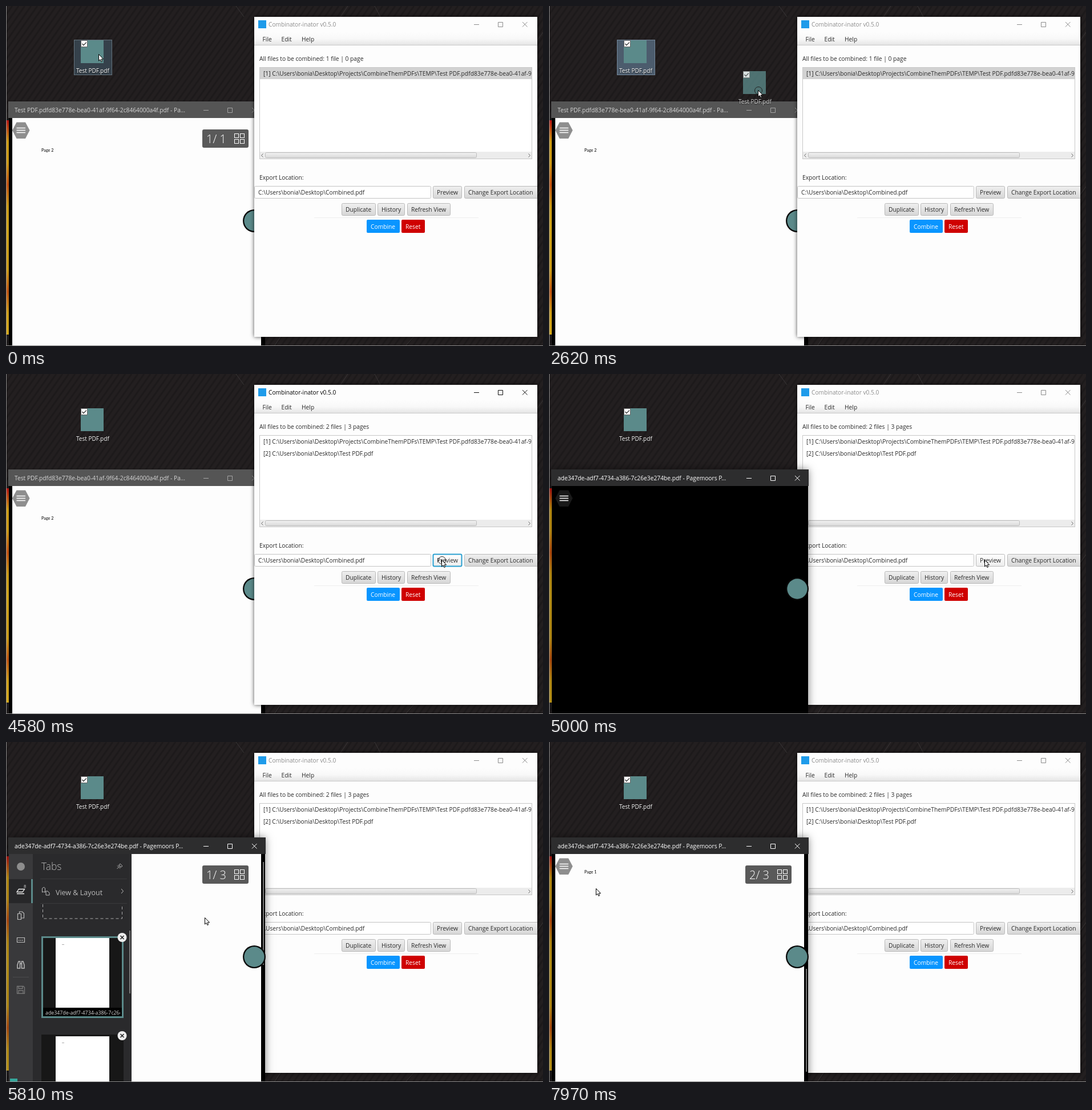
An HTML page with a canvas that plays this animation: 941 by 595 pixels, repeating every 8 s.

```html
<!DOCTYPE html>
<html lang="en">
<head>
<meta charset="utf-8">
<title>Combining PDF files</title>
<style>
  html, body { margin: 0; width: 100%; height: 100%; overflow: hidden; background: #231f20; }
  canvas { display: block; }
</style>
</head>
<body>
<canvas id="stage" width="941" height="595"></canvas>
<script>
const g = document.getElementById('stage').getContext('2d');
const LOOP = 8000, TEAL = '#5b8a8a', USER = 'C:\\Users\\bonia\\Desktop\\';
const OLD_ID = 'Test PDF.pdfd83e778e-bea0-41af-9f64-2c8464000a4f.pdf';
const NEW_ID = 'ade347de-adf7-4734-a386-7c26e3e274be';

// pointer path: [step, x, y]
const PATH = [
  [1, 162, 84], [3, 166, 90], [4, 166, 90], [6, 110, 48], [7, 101, 39], [10, 242, 130], [12, 213, 136],
  [13, 205, 130], [15, 157, 93], [16, 157, 93], [19, 366, 147], [20, 525, 178], [24, 525, 178],
  [29, 763, 325], [37, 763, 325], [40, 432, 325], [42, 348, 307], [48, 101, 259], [50, 82, 256]
];
const clamp = (v, a = 0, b = 1) => Math.min(b, Math.max(a, v));

function pointer(n) {
  const i = PATH.findIndex(p => p[0] >= n);
  if (i < 0) return PATH[PATH.length - 1].slice(1);
  if (i === 0) return PATH[0].slice(1);
  const [a, ax, ay] = PATH[i - 1], [b, bx, by] = PATH[i], k = (n - a) / (b - a);
  return [ax + (bx - ax) * k, ay + (by - ay) * k];
}

// drawing helpers: boxes are given by their edges, text by its vertical centre
function rect(x, y, r, b, color) { g.fillStyle = color; g.fillRect(x, y, r - x, b - y); }
function frame(x, y, r, b, color, w = 1) {
  g.strokeStyle = color; g.lineWidth = w;
  g.strokeRect(x + w / 2, y + w / 2, r - x - w, b - y - w);
}
function round(x, y, r, b, rad, fill, stroke) {
  g.beginPath(); g.roundRect(x, y, r - x, b - y, rad);
  if (fill) { g.fillStyle = fill; g.fill(); }
  if (stroke) { g.strokeStyle = stroke; g.lineWidth = 1; g.stroke(); }
}
function disc(x, y, r, fill) { g.beginPath(); g.arc(x, y, r, 0, 7); g.fillStyle = fill; g.fill(); }
function path(d, color, w = 1, fill) {
  const p = new Path2D(d);
  if (fill) { g.fillStyle = fill; g.fill(p); }
  if (color) { g.strokeStyle = color; g.lineWidth = w; g.stroke(p); }
}
function text(s, x, y, color = '#2b2b2b', size = 10.25, weight = 400, face = 'Open Sans') {
  g.font = `${weight} ${size}px "${face}", sans-serif`;
  g.fillStyle = color;
  g.fillText(s, x, y + size * .357);
}
function vgrad(y, b, ...stops) {
  const v = g.createLinearGradient(0, y, 0, b);
  stops.forEach((c, i) => v.addColorStop(i / (stops.length - 1), c));
  return v;
}
function clipped(x, y, r, b, draw) {
  g.save(); g.beginPath(); g.rect(x, y, r - x, b - y); g.clip(); draw(); g.restore();
}
function shadowed(blur, alpha, draw) {
  g.save(); g.shadowBlur = blur; g.shadowColor = `rgba(0,0,0,${alpha})`; draw(); g.restore();
}
function windowButtons(x, y, color) {
  path(`M${x - 5} ${y + .5}h9M${x + 37.5} ${y - 3.5}h8v8h-8zM${x + 80} ${y - 4}l8.5 8.5m0-8.5l-8.5 8.5`, color);
}

function desktop() {
  rect(0, 0, 941, 595, '#231f20');
  let d = '';
  for (let x = -420; x < 960; x += 11) d += `M${x} 595l420-595`;
  path(d, '#1d1a1b', 3);
  path('M403 0l14 19M586 19l13-19M646 0l10 19M931 60l10-14M931 330l10-14M470 595l11-16M700 595l14-16', '#393637');
  rect(0, 200, 5, 575, vgrad(200, 575, '#c11515', '#d9a514', '#d8a318', '#cf5713', '#d7a417',
    '#dcae1c', '#d9a81a', '#d7a51a', '#cc5a14', '#dba91a', '#e0b21d'));
}

function fileIcon(dx, dy, label) {
  rect(131 + dx, 60 + dy, 171 + dx, 100 + dy, TEAL);
  rect(131 + dx, 60 + dy, 143 + dx, 72 + dy, '#fff');
  frame(131 + dx, 60 + dy, 143 + dx, 72 + dy, '#666');
  path(`M${133.5 + dx} ${66 + dy}l2.5 2.7 4.7-5`, '#222', 1.2);
  g.save();
  g.shadowColor = '#000'; g.shadowBlur = 2; g.shadowOffsetY = 1;
  text(label, 123 + dx, 113 + dy, '#fff', 10.05);
  g.restore();
}

function desktopFile(t, n, x, y) {
  if (n < 6) {
    rect(119, 59, 186, 121, '#35414b'); frame(119, 59, 186, 121, '#64727c');
  } else if (n > 7 && t < 4580) {
    rect(119, 59, 186, 121, '#4c5c6d'); frame(119, 59, 186, 121, '#74879a');
  }
  fileIcon(0, 0, 'Test PDF.pdf');
  if (n > 7 && n < 13) {
    rect(101, 39, x, y, 'rgba(0,105,205,.35)');
    frame(101, 39, Math.round(x), Math.round(y), '#0a6cc0');
  }
}

function button(label, x, y, r, b, tx, state) {
  const light = state === 'hover' || state === 'focus';
  round(x + .5, y + .5, r - .5, b - .5, 2,
    light ? vgrad(y, b, '#fff', '#ececec') : vgrad(y, b, '#f0f0f0', '#d6d6d6'), '#b9b9b9');
  if (state === 'focus') {
    g.beginPath(); g.roundRect(x + .5, y + .5, r - x - 1, b - y - 1, 2);
    g.strokeStyle = '#2ba0d0'; g.lineWidth = 2; g.stroke();
  }
  text(label, tx, (y + b) / 2);
}

function combiner(t) {
  const active = t >= 4580 && t < 4850, added = t >= 3010;
  shadowed(7, .7, () => rect(435, 19, 931, 579, '#fdfdfd'));
  clipped(435, 19, 931, 579, () => {
    rect(442, 25, 456, 39, '#1e9bea');
    text('Combinator-inator v0.5.0', 460, 32.5, active ? '#000' : '#8c8c8c', 10.15);
    windowButtons(825, 32, active ? '#111' : '#8c8c8c');
    rect(435, 46, 931, 69, vgrad(46, 69, '#fdfdfd', '#f8f8f8', '#e3e3e3'));
    rect(435, 68, 931, 69, '#c9c9c9');
    text('File', 449.5, 58); text('Edit', 482.5, 58); text('Help', 518, 58);
    text('All files to be combined: ' + (added ? '2 files | 3 pages' : '1 file | 0 page'), 444, 92.5);

    rect(444, 107, 922, 268, '#fff');
    if (t < 2890) rect(444, 108, 922, 128, '#d2d2d2');
    clipped(444, 107, 922, 268, () => {
      text(`[1] ${USER}Projects\\CombineThemPDFs\\TEMP\\${OLD_ID}`, 451, 118);
      if (added) text(`[2] ${USER}Test PDF.pdf`, 451, 139.5);
    });
    rect(445, 255, 921, 268, '#ececec');
    round(454.5, 256.5, 824.5, 265.5, 2, vgrad(256, 266, '#f3f3f3', '#d9d9d9'), '#bcbcbc');
    path('M450.5 258.5l-3 3 3 3M915.5 258.5l3 3-3 3', '#666');
    frame(444, 107, 922, 268, '#c8c8c8');

    text('Export Location:', 444, 300);
    round(435.5, 315.5, 744.5, 336.5, 2, '#fff', '#c4c4c4');
    text(USER + 'Combined.pdf', 442, 326);
    button('Preview', 748, 315, 799, 337, 755, active ? 'focus' : t >= 4850 && t < 5120 ? 'hover' : '');
    button('Change Export Location', 803, 315, 936, 337, 810);
    button('Duplicate', 588, 345, 648, 367, 595);
    button('History', 651, 345, 699, 367, 658);
    button('Refresh View', 703, 345, 779, 367, 710);
    rect(540, 370, 828, 371, '#eee');
    round(632, 374, 690, 397, 2, '#0995ff');
    text('Combine', 639, 386, '#fff');
    round(693, 374, 734, 397, 2, '#cf0000');
    text('Reset', 700, 386, '#fff');
  });
}

function badge(label) {
  round(344, 216, 425, 248, 3, '#595959');
  text(label, 351, 232.5, '#fff', 20, 300);
  for (const x of [400, 410]) for (const y of [223, 233]) frame(x, y, x + 8, y + 8, '#fff');
}

function menuButton(fill) {
  path('M11 217.5L18.5 203.5H34L41.5 217.5L34 232H18.5Z', null, 0, fill);
  path('M18.5 213.5h15.500M18.5 217.5h15.500M18.5 221.5h15.500', '#fff', 1.6);
}

function tabCard(y, selected) {
  rect(62, y, 206, y + 143, '#171717');
  rect(87, y + 3, 181, y + 125, '#fff');
  rect(98, y + 14, 102, y + 15, '#aaa');
  if (selected) {
    rect(64, y + 125, 204, y + 141, '#000');
    clipped(65, y + 125, 200, y + 141, () => text(NEW_ID, 69, y + 133.500, '#ddd', 8.8));
    frame(62, y, 206, y + 143, TEAL, 3);
  }
  disc(203.5, y + 2, 8, '#eee');
  path(`M200.500 ${y - 1}l6 6m0-6l-6 6`, '#222', 1.6);
}

function sidebar() {
  rect(5, 196, 48, 594, '#39393b');
  rect(47, 196, 220, 594, '#2a2a2c');
  rect(5, 240, 45, 282, '#272729');
  rect(44, 240, 47, 282, TEAL);
  disc(26, 218, 7, '#8d8d8d');
  text('8', 31, 252, '#ddd', 7.5);
  path('M22.5 257.500h10l-3.500 5h-10zM19 265.500h13', '#eee', 1.3);
  path('M20.5 300.500h6v10h-6zM23.500 300v-3h5l3 3v8h-4.500', '#bbb', 1.2);
  path('M19.500 342.500h13v8h-13z', '#bbb', 1.2);
  path('M22 347h1.500m1.500 0h1.500m1.500 0h1.500', '#bbb', 1.500);
  path('M20 396v-6l2-6h2.500v12zM27.500 396v-12h2.500l2 6v6zM24.500 388h3', '#bbb', 1.5);
  rect(12, 411, 40, 412, '#4b4b4d');
  path('M19.500 427.500h11l2 2v10.500h-13zM22 427.500v4h7v-4M22 440v-5h8v5', '#777', 1.300);
  rect(7, 589, 20, 594, '#35a79c');
  text('Tabs', 62, 218, '#b9b9b9', 17.4, 300);
  path('M194.500 222l3-3m-2.500-2.500l5 5m-3.500-6l4.500 4.500m-3-5l2-2 4 4-2 2z', '#aaa');
  rect(60, 239, 212, 240, '#39393b');
  path('M63.500 263v-7l3-2 2 2v7l-3-1zM70 261h3l3 3v4h-6z', '#bbb');
  text('View & Layout', 87, 263.5, '#bbb', 12.500);
  path('M202 257l3.500 4-3.500 4', '#bbb');
  rect(60, 282, 212, 283, '#39393b');
  g.setLineDash([5, 4]);
  path('M64.500 284v25h139v-25', '#aaa');
  g.setLineDash([]);
  tabCard(340, true);
  tabCard(512, false);
  rect(216, 330, 218, 440, '#777');
}

function viewer(t, n) {
  const front = t >= 4850, loaded = !front || t >= 5270;
  const scroll = front ? clamp((n - 51) / 7) * 598 : 0;
  shadowed(front ? 14 : 4, front ? .5 : .3, () => rect(5, 167, 454, 595, '#000'));
  rect(4, 167, 455, 196, front ? '#2d2d2e' : '#555');
  text(front ? NEW_ID + '.pdf - Pagemoors P...' : OLD_ID + ' - Pa...', 15, 182.5, front ? '#fff' : '#d5d5d5');
  windowButtons(351, 182, front ? '#fff' : '#a5a5a5');
  clipped(4, 196, 455, 594, () => {
    if (loaded) {
      ['Page 2', 'Page 1'].forEach((label, i) => {
        const top = 196 + i * 573 - scroll;
        if (i && !front) return;
        rect(11, top, 447, top + 565, '#fdfdfd');
        text(label, 62, top + 56.500, '#222', 7.2, 600, 'Lato');
      });
      if (front) {
        const y = 210 + scroll / 598 * 187;
        rect(450, y, 452, y + 180, '#777');
      }
      if (front) badge(scroll > 299 ? '2/ 3' : '1/ 3');
      else if (t < 310) badge('1/ 1');
    }
    menuButton(loaded ? '#8e8e8e' : '#191919');
    const shut = clamp((t - 6080) / 270);
    if (front && loaded && shut < 1) {
      g.save(); g.translate(-220 * shut * shut, 0); sidebar(); g.restore();
    }
    disc(435, 376, 20, '#080808');
    disc(435, 376, 17.700, TEAL);
  });
}

function arrow(x, y, ring) {
  if (ring) {
    g.beginPath(); g.arc(x + 1, y + 1, 6.500, 0, 7);
    g.strokeStyle = ring; g.lineWidth = 1; g.stroke();
  }
  g.save(); g.translate(x, y);
  path('M.5 .5v11.500l2.600-2.400 1.800 3.900 1.800-.8-1.700-3.800h3.600z', '#000', 1, '#fff');
  g.restore();
}

function draw(now) {
  const t = now % LOOP, n = Math.floor((t - 12) / 137), [x, y] = pointer(n);
  desktop();
  desktopFile(t, n, x, y);
  if (t < 4850) { viewer(t, n); combiner(t); }
  else { combiner(t); viewer(t, n); }
  if (n > 16 && n < 21) {
    g.globalAlpha = .78;
    fileIcon(x - 157, y - 93, 'Test PDF.pdf');
    g.globalAlpha = 1;
  }
  rect(0, 0, 1, 595, '#8a8a8a');
  rect(0, 594, 941, 595, '#8a8a8a');
  const lasso = n > 6 && n < 13, drag = n > 15 && n < 21, click = t >= 4580 && t < 4730;
  arrow(x, y, lasso ? '#fff' : drag || click ? '#222' : '');
}

const start = performance.now();
function tick() {
  draw(performance.now() - start);
  requestAnimationFrame(tick);
}
tick();
</script>
</body>
</html>
```
